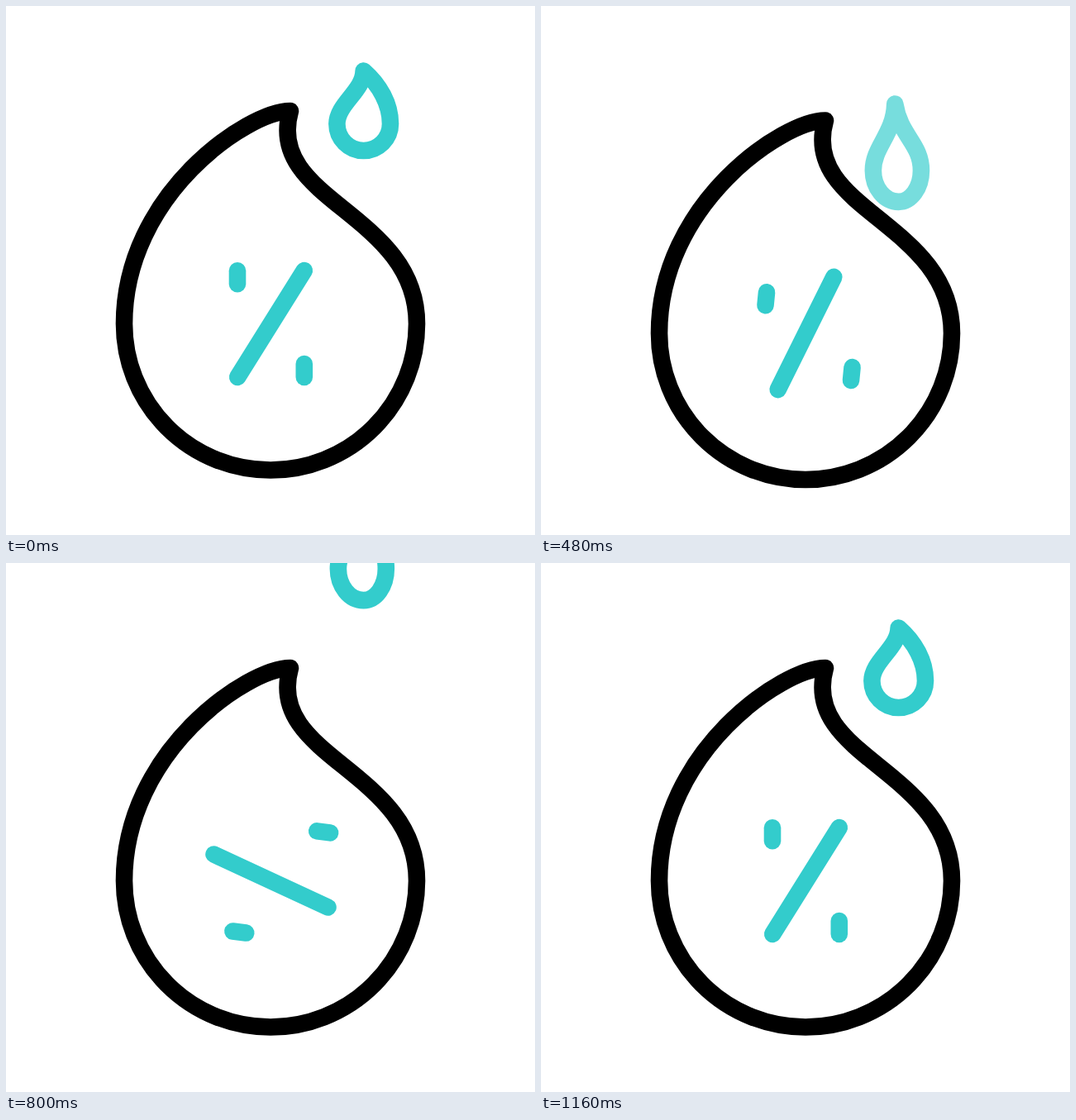
An HTML page that plays this animation: 640 by 640 pixels, repeating every 1480 ms.

```html
<!DOCTYPE html>
<html lang="en">
<head>
<meta charset="utf-8">
<title>Humidity</title>
<style>
  html, body { margin: 0; width: 100%; height: 100%; overflow: hidden; background: #fff; }
  svg { display: block; width: 100%; height: 100%; }
  path { fill: none; stroke: #3cc; stroke-width: 20.6; stroke-linecap: round; stroke-linejoin: round; }
</style>
</head>
<body>
<svg viewBox="0 0 640 640">
  <g id="body">
    <path stroke="#000" style="stroke:#000" d="M344 127C293 127 143 228 143 384.5A177 177 0 0 0 497 384.5C497 250 313 236 344 127Z"/>
    <path id="slash" d="M280.2 449L360.8 320"/>
    <path id="dotA" d="M0-8V8"/>
    <path id="dotB" d="M0-8V8"/>
  </g>
  <path id="drip"/>
</svg>
<script>
const LOOP = 1480, STEP = 40;
const $ = id => document.getElementById(id);

// Eased progress of t between two times
const ease = (t, from, to) => {
  const p = Math.min(1, Math.max(0, (t - from) / (to - from)));
  return p * p * (3 - 2 * p);
};

const track = d => {
  const path = document.createElementNS('http://www.w3.org/2000/svg', 'path');
  path.setAttribute('d', d);
  const length = path.getTotalLength();
  return p => path.getPointAtLength(p * length);
};

// Each dot swings to the other's place in two legs
const routes = {
  dotA: [track('M280 328.3C260 366 236 402 280.3 445.4'),
         track('M280.3 445.4C299 457 337 452 360.8 441')],
  dotB: [track('M360.8 441C404 430 412 351 386.5 327.7'),
         track('M386.5 327.7C368 308 310 291 280 328.3')]
};

// Small drop: tip, two left controls, left x, two right controls, right x, depth
const REST  = [0, -64, 0, -40, -32, -24, -32.2, 19.5, -47, 32.4, -24, 32.4, 32.5];
const FALL  = [-4.5, -81, -5.5, -44, -30.7, -29, -30.7, 1.5, -41, 27.2, -33, 27.2, 38];
const ENTER = [-3.5, -122, -6, -56, -30.7, -28, -30.7, -0.5, -87, 27.2, -35, 27.2, 38];

function dripPath(shape, amount) {
  const [tx, ty, ax, ay, bx, by, left, cx, cy, dx, dy, right, depth] =
    REST.map((v, i) => v + (shape[i] - v) * amount);
  const k = 0.552;
  return `M${tx} ${ty}C${ax} ${ay} ${bx} ${by} ${left} 0` +
    `C${left} ${k * depth} ${k * left} ${depth} 0 ${depth}` +
    `C${k * right} ${depth} ${right} ${k * depth} ${right} 0` +
    `C${dx} ${dy} ${cx} ${cy} ${tx} ${ty}Z`;
}

function drawDrip(t) {
  let shape, amount, y, alpha = 1;
  if (t < 680) {
    shape = FALL;
    amount = ease(t, 120, 520);
    y = 142.5 + 56.5 * (Math.max(0, t - 120) / 360) ** 2;
    alpha = Math.min(1, Math.max(0, (560 - t) / 120));
  } else {
    shape = ENTER;
    amount = 1 - ease(t, 920, 1160);
    y = 142.5 - 160.5 * (1 - ease(t, 680, 1160));
  }
  const drip = $('drip');
  drip.setAttribute('d', dripPath(shape, amount));
  drip.setAttribute('transform', `translate(432.6 ${y})`);
  drip.setAttribute('opacity', alpha);
}

function draw(t) {
  const bob = 15.5 * (ease(t, 400, 520) - ease(t, 520, 640));
  const turn = 180 * ease(t, 400, 1160);
  $('body').setAttribute('transform', `translate(0 ${bob})`);
  $('slash').setAttribute('transform', `rotate(${-turn} 320.5 384.5)`);
  for (const id in routes) {
    const [first, second] = routes[id];
    const { x, y } = t < 760 ? first(ease(t, 400, 760)) : second(ease(t, 760, 1160));
    $(id).setAttribute('transform', `translate(${x} ${y}) rotate(${turn})`);
  }
  drawDrip(t);
}

const start = performance.now();
function frame() {
  const t = (performance.now() - start) % LOOP;
  draw(Math.floor(t / STEP) * STEP);
  requestAnimationFrame(frame);
}
frame();
</script>
</body>
</html>
```
